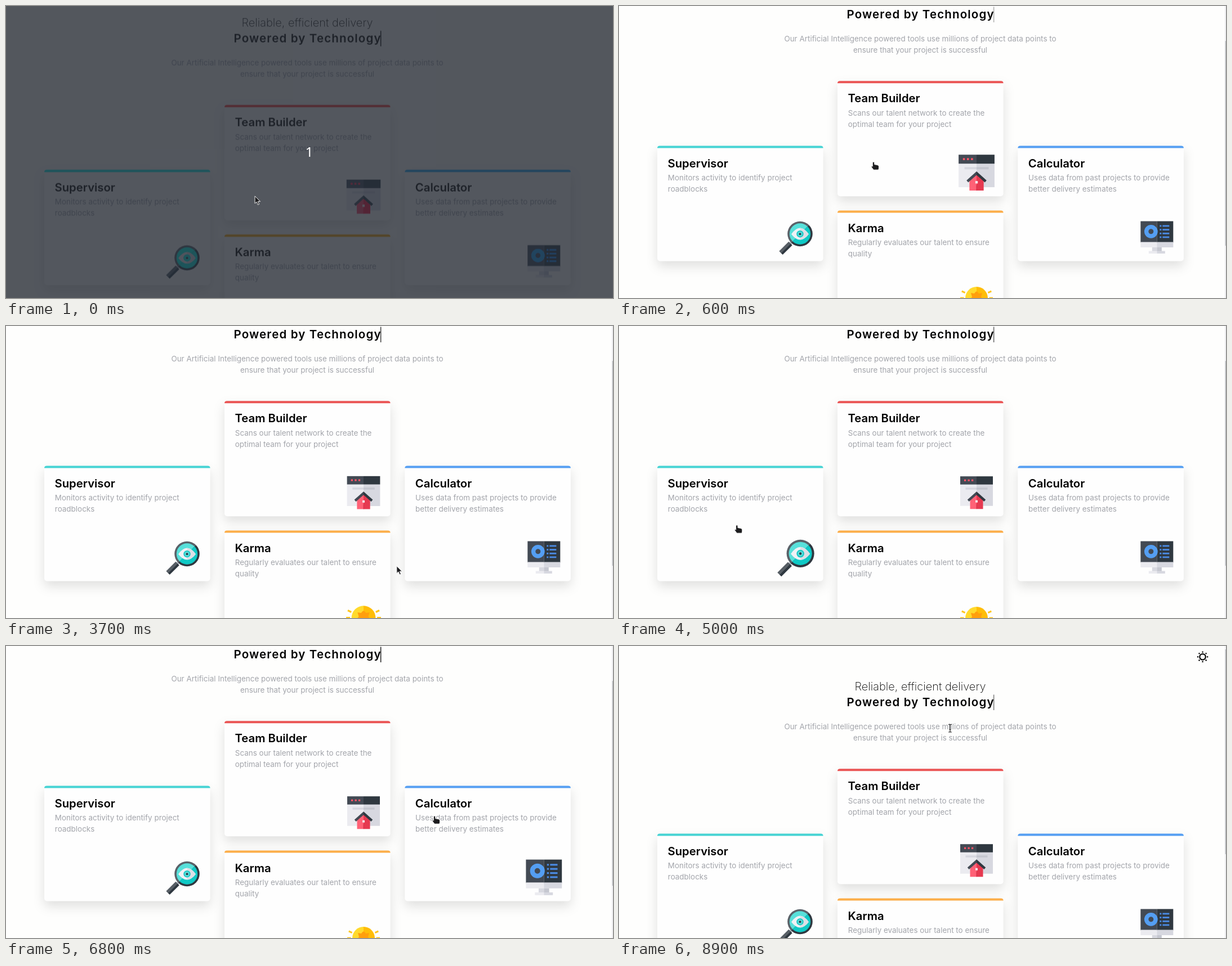
These frames come from a looping animation (1078 px wide and 519 px high, 9000 ms). An HTML page:

```html
<!DOCTYPE html>
<html lang="en">
<head>
<meta charset="utf-8">
<title>Feature cards</title>
<style>
  html, body { margin: 0; width: 100%; height: 100%; overflow: hidden; background: #fefefd; }
  svg { display: block; width: 100vw; height: 100vh; font-family: Inter, "Open Sans", sans-serif; }
  .light { font-size: 20px; font-weight: 200; }
  .strong { font-size: 20.5px; font-weight: 600; letter-spacing: 1.15px; }
  .name { font-size: 20.3px; font-weight: 600; }
  .note { font-size: 13.45px; fill: #a3a5ab; }
  .panel { fill: #fefefe; filter: drop-shadow(0 9px 10px rgba(0, 0, 0, .12)); }
  .count { font: 500 24px "Noto Sans", "Open Sans", sans-serif; fill: #fff; }
  .pointer path { fill: #1c1c1e; stroke: #fff; stroke-width: .9; }
  .pointer #beam { fill: none; stroke: #222; stroke-width: 1.2; }
</style>
</head>
<body>
<svg viewBox="0 0 1078 519" preserveAspectRatio="none">
  <rect width="1078" height="519" fill="#fefefd"/>
  <g id="page">
    <g id="sun" fill="none" stroke="#000" stroke-width="2.2" transform="translate(1036.5 19.3)">
      <circle r="5.2"/>
    </g>
    <text class="light" x="535" y="79.3" text-anchor="middle">Reliable, efficient delivery</text>
    <text class="strong" x="404.5" y="107.3">Powered by Technology</text>
    <rect id="caret" x="664.8" y="86.5" width="1.6" height="27.5"/>
    <g class="note" text-anchor="middle">
      <text x="535" y="148">Our Artificial Intelligence powered tools use millions of project data points to</text>
      <text x="535" y="168">ensure that your project is successful</text>
    </g>
    <g id="cards"></g>
  </g>
  <g id="bar">
    <rect x="1076" width="2" height="519" fill="#ececee"/>
    <rect id="thumb" x="1076.6" width="1.4" height="364" fill="#b9bbbf"/>
  </g>
  <g id="dim">
    <rect width="1078" height="519" fill="#262b33" fill-opacity=".79"/>
    <text class="count" x="538.5" y="268" text-anchor="middle">1</text>
  </g>
  <g id="pointer" class="pointer">
    <path id="arrow" d="M0 0V13l3-2.8 2.3 5.2 2.3-1-2.3-4.9h4.2z"/>
    <path id="hand" d="M-1.7 1Q0-1.2 1.7 1V4.6l5 .9q3 .6 2.8 3V11q0 2-1 3.2H0L-3.7 9.2q-.6-1.9 1-1.7l1 .8z"/>
    <path id="beam" d="M-3-6.5H-1Q0-6.5 0-5.5Q0-6.5 1-6.5H3M0-5.5V6M-3 7H-1Q0 7 0 6Q0 7 1 7H3M-1.5 2.5H1.5"/>
  </g>
</svg>
<script>
const LOOP = 9000, GROW = 300;
const $ = id => document.getElementById(id);
const slate = ['#434a54', '#2f3840'], pale = ['#ebebf0', '#d7d8e0'];

const rect = (x, y, w, h, fill) =>
  `<rect x="${x}" y="${y}" width="${w}" height="${h}" fill="${fill}"/>`;
const path = (d, fill) => `<path d="${d}" fill="${fill}"/>`;
const disc = (x, y, r, fill) => `<circle cx="${x}" cy="${y}" r="${r}" fill="${fill}"/>`;
// Box centred on x = 29, in a light and a dark half
const split = (x, y, h, [a, b]) => rect(x, y, 29 - x, h, a) + rect(29, y, 29 - x, h, b);
// Round shape at the origin, in two halves
const halves = (r, [a, b]) =>
  path(`M0 ${-r}A${r} ${r} 0 0 0 0 ${r}z`, a) + path(`M0 ${-r}A${r} ${r} 0 0 1 0 ${r}z`, b);

function houseIcon() {
  return split(0, 14, 38.5, pale) + split(0, 0, 14.5, slate) +
    [7, 13.5, 20].map(x => rect(x, 5.5, 3.2, 3.2, '#ff5468')).join('') +
    split(9.5, 20, 3.6, ['#d7d8e0', '#c5c7d0']) +
    path('M29 32L17.5 42V58H29z', '#ff6176') + path('M29 32L40.5 42V58H29z', '#e63950') +
    path('M29 27L12.8 41.5L15.6 44.8L29 33z', slate[0]) +
    path('M29 27L45.2 41.5L42.4 44.8L29 33z', slate[1]) +
    rect(27, 42.5, 4, 4, '#f4e6ea') + rect(28.6, 49, .8, 9, '#c92f45');
}

function lensIcon() {
  return '<g transform="translate(35.5 22.5) rotate(45)">' +
    rect(-2.5, 20, 5, 6, '#b9bcc4') +
    path('M-4.5 24H0V48H-4.5z', '#565d64') + path('M0 24H4.5V48H0z', slate[1]) +
    halves(22.3, ['#5a6168', slate[1]]) + halves(18.7, ['#58e0da', '#0fc9c5']) + '</g>' +
    path('M20 23Q35.5 1 51 23Q35.5 43 20 23z', '#f0f1f5') +
    path('M35.5 12Q44 13 51 23Q44 32 35.5 33z', '#dcdfe6') +
    disc(35.5, 22.7, 6.2, '#17c9c6') + disc(35.5, 22.7, 4.2, '#5fdcda') +
    disc(35.5, 22.7, 2, slate[1]);
}

function screenIcon() {
  const rows = [7, 13.7, 20.4, 27];
  return split(0, 0, 38, slate) + split(0, 37, 9.5, pale) +
    split(20.5, 46.5, 7, ['#d7d8e0', '#c5c7d0']) + split(14.5, 53, 4.5, pale) +
    '<circle cx="18.5" cy="18.3" r="8.2" fill="none" stroke="#549ef2" stroke-width="7.4"/>' +
    rows.map(y => rect(34, y, 3, 2.8, '#4b8be4') + rect(39, y, 12, 2.8, '#4b8be4')).join('');
}

function coinIcon() {
  const rays = [-25, 0, 25, 155, 180, 205].map(a =>
    `<path d="M22.5 0H29" stroke="#ffc61a" stroke-width="3" transform="rotate(${a})"/>`).join('');
  return `<g transform="translate(29 21.5)">${rays}${halves(20, ['#ffda2d', '#ffbd08'])}` +
    path('M-10-9L-4-8Q0-15 4-8L10-9L8-2Q13 3 7 6L8 12H-8L-7 6Q-13 3-8-2z', '#ff9f0e') + '</g>';
}

const cards = [
  { x: 388, y: 218.2, color: '#ea5454', name: 'Team Builder', icon: houseIcon,
    note: ['Scans our talent network to create the', 'optimal team for your project'] },
  { x: 68, y: 333.5, color: '#45d3d3', name: 'Supervisor', icon: lensIcon,
    note: ['Monitors activity to identify project', 'roadblocks'] },
  { x: 708.3, y: 333.5, color: '#549ef2', name: 'Calculator', icon: screenIcon,
    note: ['Uses data from past projects to provide', 'better delivery estimates'] },
  { x: 388, y: 448.6, color: '#fcae4a', name: 'Karma', icon: coinIcon,
    note: ['Regularly evaluates our talent to ensure', 'quality'] }
];
const W = 294.6, H = 205;

$('cards').innerHTML = cards.map(c => `<g transform="translate(${c.x} ${c.y})">
  <rect class="panel" width="${W}" height="${H}" rx="5"/>
  <path d="M0 4Q0 0 4.5 0H${W - 4.5}Q${W} 0 ${W} 4z" fill="${c.color}"/>
  <text class="name" x="18.5" y="38">${c.name}</text>
  <text class="note" x="18.8" y="61.7">${c.note[0]}</text>
  <text class="note" x="18.8" y="81.7">${c.note[1]}</text>
  <g class="icon">${c.icon()}</g></g>`).join('');
const icons = [...document.querySelectorAll('.icon')];

$('sun').innerHTML += Array.from({ length: 8 }, (_, i) =>
  `<path d="M7.4 0H9.7" transform="rotate(${i * 45})"/>`).join('');

// Rows of [time, values...], joined by straight lines
function track(rows, t) {
  const i = rows.findIndex(r => r[0] > t);
  if (i === 0) return rows[0].slice(1);
  if (i < 0) return rows[rows.length - 1].slice(1);
  const a = rows[i - 1], b = rows[i], k = (t - a[0]) / (b[0] - a[0]);
  return a.slice(1).map((v, n) => v + (b[n + 1] - v) * k);
}

const scrollRows = [[0, 42.3], [300, 75], [500, 85], [7200, 85], [7500, 55], [7800, 0]];
const route = [
  [-150, 375, 338], [0, 442, 338], [600, 452, 277], [1050, 452, 277], [1400, 430, 430],
  [1700, 290, 420], [1850, 282, 400], [2150, 290, 395], [2400, 532, 285], [2850, 700, 300],
  [3050, 860, 330], [3350, 640, 290], [3600, 640, 430], [3900, 800, 420], [4200, 820, 340],
  [4500, 560, 400], [4680, 280, 380], [5000, 209, 354], [5300, 300, 340], [5600, 560, 320],
  [5900, 520, 430], [6050, 483, 438], [6400, 700, 340], [6800, 761, 302], [7000, 761, 302],
  [7300, 700, 150], [7500, 610, 105], [7900, 602, 112], [8300, 588, 146]
];

const scrollAt = t => track(scrollRows, t)[0];
function over(card, t) {
  const [x, y] = track(route, t), py = y + scrollAt(t);
  return x > card.x && x < card.x + W && py > card.y && py < card.y + H;
}
// Share of the recent past spent over the card
function growth(card, t) {
  const n = 24;
  let hits = 0;
  for (let i = 0; i < n; i++) hits += over(card, t - (i + .5) * GROW / n);
  return hits / n;
}

const show = (id, on) => $(id).setAttribute('display', on ? 'inline' : 'none');

function draw(t) {
  const s = scrollAt(t), [x, y] = track(route, t), dim = t < 100;
  $('page').setAttribute('transform', `translate(0 ${-s})`);
  $('page').style.filter = dim ? 'saturate(2)' : 'none';
  $('thumb').setAttribute('y', 6 + s * .66);
  show('dim', dim);
  show('bar', !dim);

  const phase = (((t - 2385) / 965) % 1 + 1) % 1;
  $('caret').setAttribute('opacity', 1 - Math.abs(1 - 2 * phase));

  cards.forEach((c, i) => icons[i].setAttribute('transform',
    `translate(247 163) scale(${1 + .1 * growth(c, t)}) translate(-29 -29)`));

  const beam = t >= 8000, hand = !dim && !beam && cards.some(c => over(c, t));
  show('beam', beam);
  show('hand', hand);
  show('arrow', !beam && !hand);
  $('pointer').setAttribute('transform', `translate(${x} ${y})`);
}

const start = performance.now();
function tick() {
  draw((performance.now() - start) % LOOP);
  requestAnimationFrame(tick);
}
tick();
</script>
</body>
</html>
```
